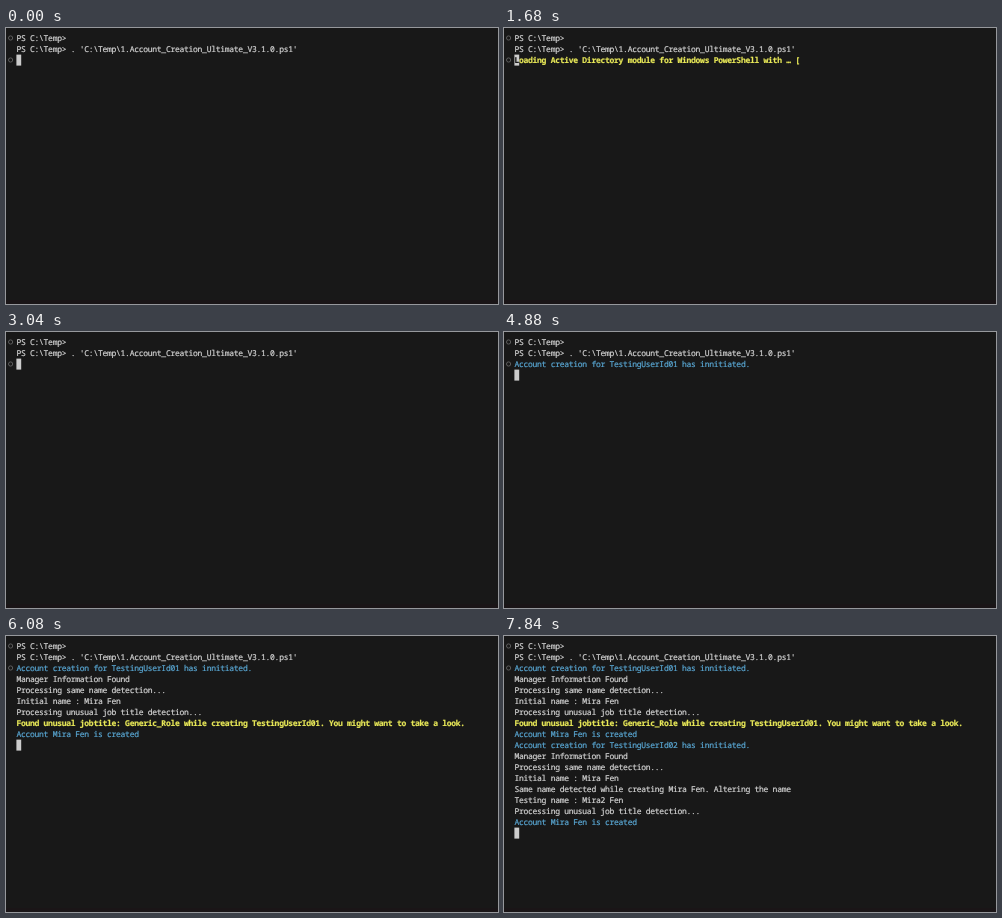
An HTML page for the animation above (8 s loop, 492 by 276 pixels).

```html
<!DOCTYPE html>
<html lang="en">
<head>
<meta charset="utf-8">
<title>Terminal session</title>
<style>
  html, body { margin: 0; height: 100%; overflow: hidden; background: #181818; }
  svg { display: block; width: 100vw; height: 100vh; }
  text {
    font: 500 8px "Noto Sans Mono", "DejaVu Sans Mono", monospace;
    letter-spacing: -.27px;
    white-space: pre;
    text-rendering: geometricPrecision;
    color: #d6d6d6;
    fill: currentColor;
    stroke: currentColor;
    stroke-width: .2;
  }
  .info { color: #5aa9d6; }
  .warn { color: #e8e858; font-weight: 600; }
  .under { color: #181818; font-weight: 600; }
  .mark { fill: none; stroke: #646464; stroke-width: .9; }
</style>
</head>
<body>
<svg id="stage" viewBox="0 0 492 276">
  <rect width="492" height="276" fill="#181818"/>
  <rect y="272" width="492" height="4" fill="#1a1517"/>
  <circle class="mark" cx="4.6" cy="10" r="2.1"/>
  <circle class="mark" cx="4.6" cy="32" r="2.1"/>
  <g id="lines"></g>
  <rect id="cursor" x="10.4" width="4.8" height="11" fill="#cccccc"/>
  <text id="under" class="under" x="10.4" y="35.1"></text>
</svg>
<script>
const LOOP = 8000, LEFT = 10.4, PITCH = 11, FIRST_OUTPUT = 2;
const lines = document.getElementById('lines');
const cursor = document.getElementById('cursor');
const under = document.getElementById('under');

function addLine(row, text, kind = '') {
  const el = document.createElementNS('http://www.w3.org/2000/svg', 'text');
  el.setAttribute('x', LEFT);
  el.setAttribute('y', 13.1 + PITCH * row);
  el.setAttribute('class', kind);
  el.textContent = text;
  lines.append(el);
  return el;
}

addLine(0, 'PS C:\\Temp>');
addLine(1, "PS C:\\Temp> . 'C:\\Temp\\1.Account_Creation_Ultimate_V3.1.0.ps1'");

// Progress messages: start, end, text
const progress = [
  [1440, 2000, 'Loading Active Directory module for Windows PowerShell with … ['],
  [2000, 2400, 'Creating implicit remoting module ... [Getting command information from remote session ... 1 commands received]']
].map(([start, end, text]) => ({ start, end, text, el: addLine(FIRST_OUTPUT, text, 'warn') }));

// Lasting output: time of appearance, text, kind
const output = [
  [4880, 'Account creation for TestingUserId01 has innitiated.', 'info'],
  [4960, 'Manager Information Found'],
  [5040, 'Processing same name detection...'],
  [5120, 'Initial name : Mira Fen'],
  [5200, 'Processing unusual job title detection...'],
  [5280, 'Found unusual jobtitle: Generic_Role while creating TestingUserId01. You might want to take a look.', 'warn'],
  [5440, 'Account Mira Fen is created', 'info'],
  [7440, 'Account creation for TestingUserId02 has innitiated.', 'info'],
  [7520, 'Manager Information Found'],
  [7520, 'Processing same name detection...'],
  [7600, 'Initial name : Mira Fen'],
  [7680, 'Same name detected while creating Mira Fen. Altering the name'],
  [7760, 'Testing name : Mira2 Fen'],
  [7760, 'Processing unusual job title detection...'],
  [7840, 'Account Mira Fen is created', 'info']
].map(([start, text, kind], i) => ({ start, el: addLine(FIRST_OUTPUT + i, text, kind) }));

function show(el, on) {
  el.setAttribute('visibility', on ? 'visible' : 'hidden');
}

function draw() {
  const t = performance.now() % LOOP;
  let row = FIRST_OUTPUT, covered = '';
  for (const p of progress) {
    const on = t >= p.start && t < p.end;
    show(p.el, on);
    if (on) covered = p.text[0];
  }
  for (const o of output) {
    const on = t >= o.start;
    show(o.el, on);
    if (on) row++;
  }
  cursor.setAttribute('y', 4.6 + PITCH * row);
  under.textContent = covered;
  requestAnimationFrame(draw);
}
draw();
</script>
</body>
</html>
```
